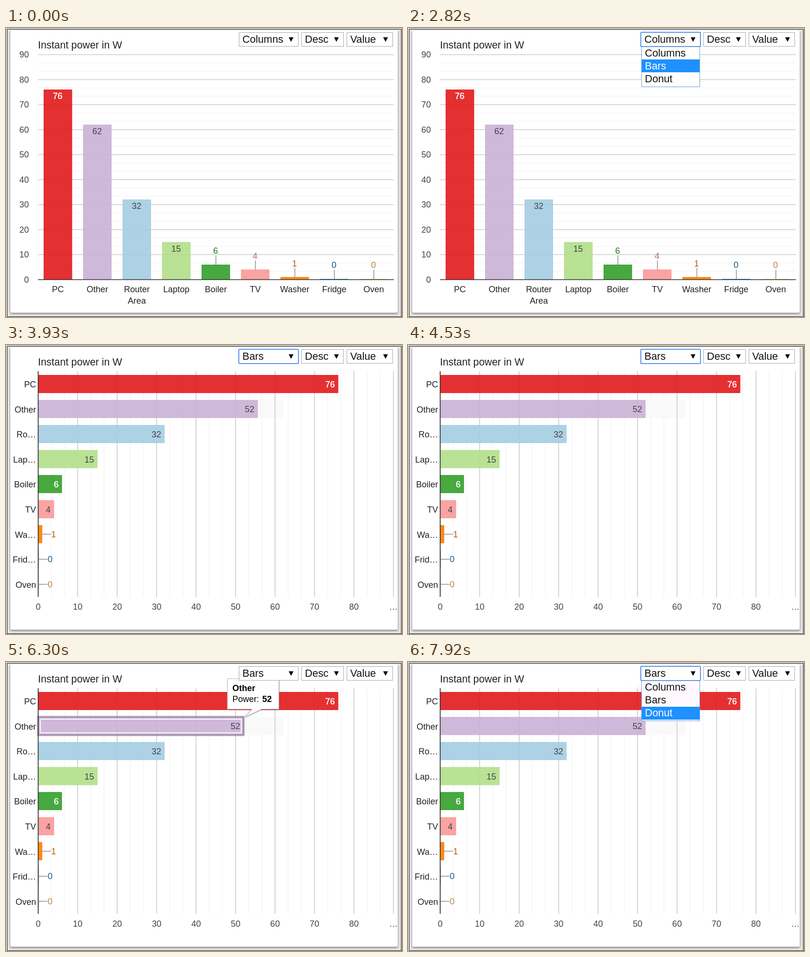
An HTML page with a canvas for the animation above (8 s loop, 830 by 607 pixels).

```html
<!DOCTYPE html>
<html lang="en">
<head>
<meta charset="utf-8">
<title>Instant power</title>
<style>
html, body { margin: 0; width: 100%; height: 100%; overflow: hidden; background: #e4e2e2; }
canvas { display: block; }
</style>
</head>
<body>
<canvas id="stage" width="830" height="607"></canvas>
<script>
const ctx = document.getElementById('stage').getContext('2d');
const LOOP = 8000;
const SANS = '"Liberation Sans", Arial, sans-serif';

// name, short name, value, bar colour, label colour
const ITEMS = [
  ['PC', 'PC', 76, '#e31a1c', '#fff'],
  ['Other', 'Other', 62, '#cab2d6', '#444'],
  ['Router Area', 'Ro…', 32, '#a6cee3', '#444'],
  ['Laptop', 'Lap…', 15, '#b2df8a', '#444'],
  ['Boiler', 'Boiler', 6, '#33a02c', '#24761f'],
  ['TV', 'TV', 4, '#fb9a99', '#b76b6a'],
  ['Washer', 'Wa…', 1, '#ff7f00', '#b85c00'],
  ['Fridge', 'Frid…', 0, '#1f78b4', '#175a87'],
  ['Oven', 'Oven', 0, '#fdbf6f', '#b58845']
].map(([name, short, value, color, ink]) => ({ name, short, value, color, ink }));

const within = (t, a, b) => t >= a && t < b;
const clamp01 = v => Math.max(0, Math.min(1, v));

function text(str, x, y, { size = 18, color = '#222', align = 'left', bold = false } = {}) {
  ctx.font = `${bold ? 'bold ' : ''}${size}px ${SANS}`;
  ctx.textAlign = align;
  ctx.textBaseline = 'alphabetic';
  ctx.fillStyle = color;
  ctx.fillText(str, x, y + size * 0.36);
}

function rect(x, y, w, h, color) {
  ctx.fillStyle = color;
  ctx.fillRect(x, y, w, h);
}

function frame(x, y, w, h, color, width = 1) {
  ctx.strokeStyle = color;
  ctx.lineWidth = width;
  ctx.strokeRect(x, y, w, h);
}

function line(x1, y1, x2, y2, color, width = 1.7) {
  ctx.strokeStyle = color;
  ctx.lineWidth = width;
  ctx.beginPath();
  ctx.moveTo(x1, y1);
  ctx.lineTo(x2, y2);
  ctx.stroke();
}

function bar(x, y, w, h, color) {
  ctx.globalAlpha = 0.9;
  rect(x, y, w, h, color);
  ctx.globalAlpha = 1;
  if (Math.min(w, h) > 2) frame(x + 0.5, y + 0.5, w - 1, h - 1, color);
}

function valueLabel(value, x, y, color, align) {
  text(value, x, y, { color, align });
  if (color === '#fff') {
    ctx.strokeStyle = color;
    ctx.lineWidth = 0.5;
    ctx.strokeText(value, x, y + 18 * 0.36);
  }
}

function card() {
  rect(0, 0, 830, 607, '#e4e2e2');
  ctx.save();
  ctx.shadowColor = 'rgba(0,0,0,.45)';
  ctx.shadowBlur = 4;
  ctx.shadowOffsetY = 2;
  ctx.fillStyle = '#fff';
  ctx.beginPath();
  ctx.roundRect(9, 5, 812, 593, 3);
  ctx.fill();
  ctx.restore();
  frame(2.5, 2.5, 826, 604, '#111');
  text('Instant power in W', 67, 35, { size: 21.3 });
}

function columns() {
  const base = 528.5, unit = 5.25, left = 67, right = 813;
  for (let i = 0; i <= 27; i++) {
    const y = base - i * unit * 10 / 3;
    if (i % 3) line(left, y, right, y, '#f1f1f1', 1.2);
    else line(left, y, right, y, '#ccc');
  }
  for (let v = 0; v <= 90; v += 10) text(v, 48, base - v * unit, { color: '#444', align: 'right' });

  ITEMS.forEach((item, i) => {
    const mid = 67.3 + 82.75 * (i + 0.5);
    const h = Math.max(item.value * unit, 1.5), top = base - h;
    bar(mid - 29.7, top, 59.4, h, item.color);
    if (item.value > 10) {
      valueLabel(item.value, mid - 0.5, top + 13.5, item.ink, 'center');
    } else {
      line(mid + 0.3, top - 19, mid + 0.3, top, '#999');
      valueLabel(item.value, mid - 0.5, top - 29, item.ink, 'center');
    }
    item.name.split(' ').forEach((word, n) => text(word, mid, 549 + n * 24, { align: 'center' }));
  });
  line(left, base, right, base, '#333');
}

function glow(x, y, w, h, selected) {
  ctx.save();
  ctx.beginPath();
  ctx.rect(x - 4, y - 4, w + 8, h + 8);
  ctx.rect(x + 1, y + 1, w - 2, h - 2);
  ctx.clip('evenodd');
  for (const width of [2, 4, 6]) frame(x, y, w, h, 'rgba(40,20,50,.16)', width);
  ctx.restore();
  if (selected) frame(x + 4.5, y + 4.5, w - 9, h - 9, '#fff', 1.8);
}

function bars(t) {
  const base = 67.5, unit = 8.273, top = 55, bottom = 529;
  const shrink = clamp01((t - 3720) / 330);
  const grid = (first, step, color, width) => {
    for (let i = first; i <= 27; i += step) {
      const x = base + i * unit * 10 / 3;
      line(x, top, x, bottom, color, width);
    }
  };
  grid(1, 3, '#f1f1f1', 1.2);
  grid(2, 3, '#f1f1f1', 1.2);
  if (shrink > 0) rect(498, 115, 83, 38.5, '#f9f9f9');
  grid(0, 3, '#ccc', 1.7);
  for (let v = 0; v <= 90; v += 10) {
    text(v < 90 ? v : '…', base + v * unit, 550, { color: '#444', align: 'center' });
  }

  const pcHover = within(t, 3720, 3780) || within(t, 4380, 4530) ||
    within(t, 5730, 5820) || within(t, 6510, 6780);
  const otherHover = within(t, 5880, 6510);
  const selected = within(t, 6300, 6450);

  ITEMS.forEach((item, i) => {
    const mid = 55.5 + 52.6 * (i + 0.5);
    const value = i === 1 ? 62 - 10 * shrink : item.value;
    const w = Math.max(value * unit, 1), end = base + w;
    bar(base, mid - 18.8, w, 37.6, item.color);
    if (i === 0 && pcHover || i === 1 && otherHover) {
      glow(base, mid - 18.8, w, 37.6, i === 1 && selected);
    }
    if (value >= 4) {
      const shown = i === 1 && shrink > 0 ? 52 : item.value;
      valueLabel(shown, end - 7, mid + 0.5, i === 4 ? '#fff' : i === 5 ? '#444' : item.ink, 'right');
    } else {
      line(end, mid, end + 18.5, mid, '#999');
      valueLabel(item.value, end + 24, mid, item.ink, 'center');
    }
    text(item.short, 63, mid + 0.8, { align: 'right' });
  });
  line(base, top, base, bottom, '#333');
}

function tooltip(alpha) {
  ctx.save();
  ctx.globalAlpha = alpha;
  ctx.beginPath();
  ctx.moveTo(465, 35);
  for (const [x, y] of [[571, 35], [572, 36], [572, 99], [536, 99], [499.5, 116], [516, 99], [464, 99], [464, 36]]) {
    ctx.lineTo(x, y);
  }
  ctx.closePath();
  if (alpha === 1) {
    ctx.shadowColor = 'rgba(0,0,0,.4)';
    ctx.shadowBlur = 3;
    ctx.shadowOffsetX = ctx.shadowOffsetY = 1;
    ctx.fillStyle = '#fff';
    ctx.fill();
    ctx.shadowColor = 'transparent';
  }
  ctx.strokeStyle = '#bbb';
  ctx.lineWidth = 1.2;
  ctx.stroke();
  text('Other', 474.5, 55, { bold: true, color: '#000' });
  text('Power:', 474.5, 78, { color: '#000' });
  text('52', 537, 78, { bold: true, color: '#000' });
  ctx.restore();
}

function select(label, x, w, state) {
  rect(x, 9, w, 30, '#fff');
  if (state === 'focus') {
    ctx.strokeStyle = '#5a93ec';
    ctx.lineWidth = 2;
    ctx.beginPath();
    ctx.roundRect(x, 9, w, 30, 1.5);
    ctx.stroke();
  } else {
    frame(x + 0.5, 9.5, w - 1, 29, state === 'hover' ? '#555' : '#a6a6a6');
  }
  text(label, x + 7.5, 23.5, { size: 21.7, color: '#111' });
  const mid = x + w - 15.5;
  ctx.fillStyle = '#000';
  ctx.beginPath();
  ctx.moveTo(mid - 5, 19.5);
  ctx.lineTo(mid + 5, 19.5);
  ctx.lineTo(mid, 29);
  ctx.fill();
}

function list(active, tint) {
  rect(489, 39, 123, 85, tint);
  ['Columns', 'Bars', 'Donut'].forEach((name, i) => {
    const y = 39 + i * 27.4;
    if (i === active) rect(490, Math.round(y), 121, 27, '#1e90ff');
    text(name, 496.5, y + 12.8, { size: 21.7, color: i === active ? '#fff' : '#111' });
  });
  frame(489.5, 39.5, 122, 84, '#6d9bd8');
}

function draw(t) {
  const barMode = t >= 3480;
  card();
  if (barMode) bars(t); else columns();

  if (within(t, 6300, 6450)) tooltip(1);
  else if (t >= 6450) tooltip(0.04);

  let state = 'idle';
  if (within(t, 2040, 6180) || t >= 7260) state = 'focus';
  else if (within(t, 720, 2040) || t >= 6900) state = 'hover';
  select(barMode ? 'Bars' : 'Columns', 488, 125, state);
  select('Desc', 619, 89, within(t, 570, 630) ? 'hover' : 'idle');
  select('Value', 714, 97, 'idle');

  if (within(t, 2040, 3480)) list(t < 2820 ? 0 : 1, '#fff');
  if (t >= 7290) list(t >= 7920 ? 2 : within(t, 7680, 7770) ? 0 : 1, '#fff9fd');
}

const start = performance.now();
function tick() {
  draw((performance.now() - start) % LOOP);
  requestAnimationFrame(tick);
}
tick();
</script>
</body>
</html>
```
